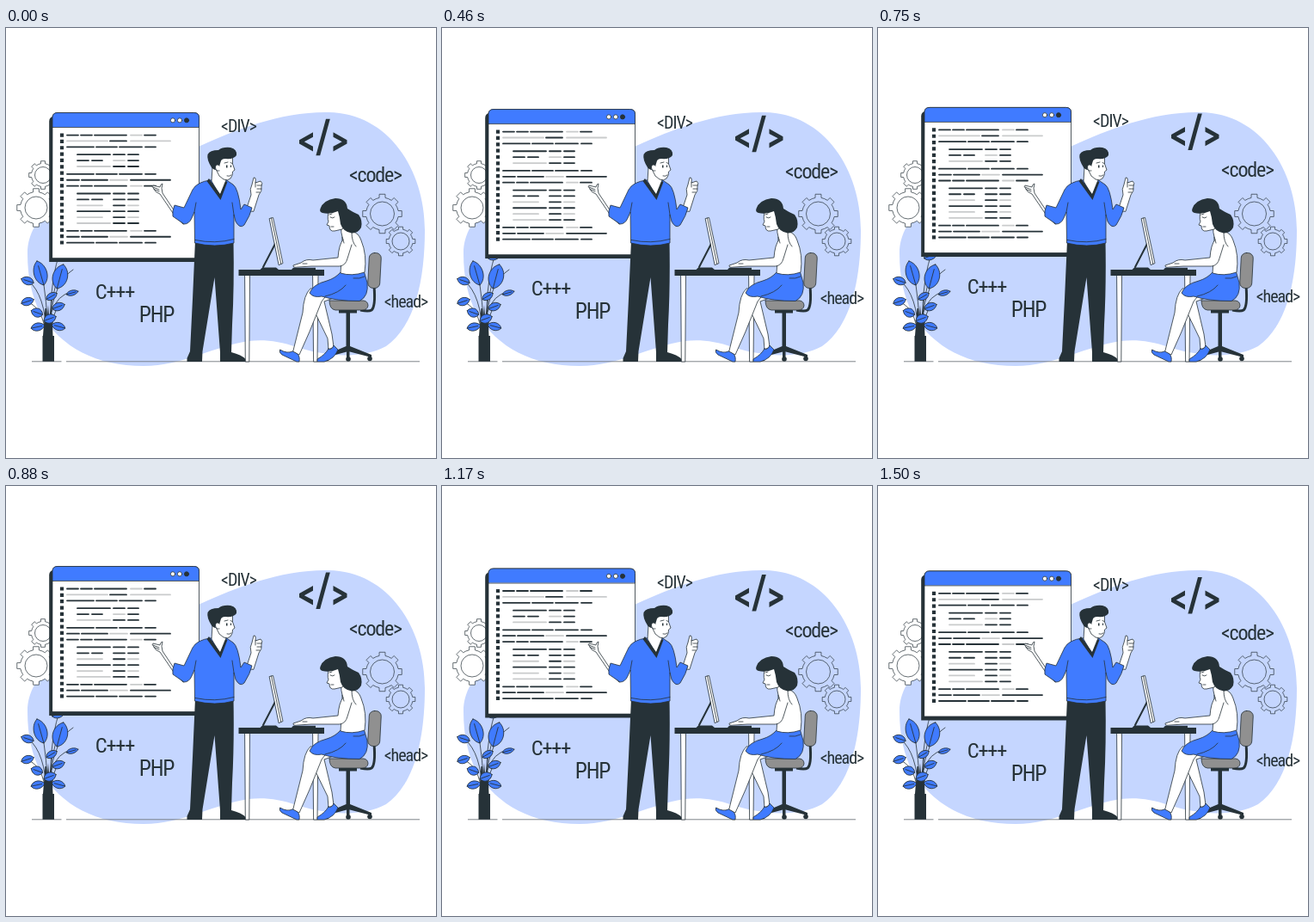
Recreate the animation shown at these times as an HTML page. Size 500 by 500 pixels, loop 1540 ms.

```html
<!DOCTYPE html>
<html lang="en">
<head>
<meta charset="utf-8">
<title>Developers</title>
<style>
  html, body { margin: 0; width: 100%; height: 100%; overflow: hidden; background: #fff; }
  svg { display: block; width: 100%; height: 100%; }
  .ink { fill: #263238; }
  .blue { fill: #407bff; }
  .white { fill: #fff; }
  .gray { fill: #909090; }
  .line { stroke: #263238; stroke-width: .8; stroke-linejoin: round; stroke-linecap: round; }
  .none { fill: none; }
  text {
    font-family: "Roboto Condensed", "Liberation Sans Narrow", "Open Sans Condensed", Roboto, sans-serif;
    font-stretch: condensed; font-weight: 400; letter-spacing: -.05em;
    text-anchor: middle; fill: #263238;
  }
</style>
</head>
<body>
<svg viewBox="0 0 500 500">
  <path fill="#c5d6ff" d="M25 262C25 238 38 222 52 207C85 172 160 165 226 137C268 118 320 97 375 98C445 99 487 165 487 235C487 292 476 346 442 370C412 387 365 380 338 371C318 364 300 362 282 364C245 369 205 393 160 393C105 393 65 372 40 332C30 312 25 290 25 262Z"/>
  <path d="M30 387.8H64.5M70 387.8H481" stroke="#70777b" stroke-width=".9"/>
  <g id="gears"></g>

  <g id="plant">
    <path class="line none" d="M48 358Q49 320 40 276M50 358Q50 315 64 280M52 358Q50 300 61 266M47 358Q46 310 26 294M46 358Q44 325 24 318M53 358Q54 328 62 323M53 330Q60 310 76 307M51 340Q56 295 78 281"/>
    <path class="ink" d="M43 358L45.5 326 47 326 47.5 340 49 322 50.5 340 53 323 54.5 358Z"/>
    <g id="leaves"></g>
    <path class="ink" d="M42.5 358H56V387.8H42.5Z"/>
  </g>

  <g class="float">
    <path class="ink" d="M50.2 109Q50.2 103.400 56 103.400H222V272.400H50.2Z"/>
    <path class="white line" d="M54 104.500Q54 98.900 60 98.900H218.5Q224.5 98.900 224.5 104.500V268H54Z"/>
    <path class="blue line" d="M54 115.500V104.500Q54 98.900 60 98.900H218.5Q224.5 98.900 224.5 104.500V115.500Z"/>
    <g class="white line">
      <circle cx="194" cy="107.7" r="2.6"/>
      <circle cx="202" cy="107.7" r="2.6"/>
      <circle class="ink" cx="210" cy="107.7" r="2.6"/>
    </g>
    <path d="M65 122.8V252.500" stroke="#263238" stroke-width="4.2" stroke-dasharray="4.2 3.15"/>
    <g id="code" stroke-width="1.8" stroke-linecap="round"></g>
  </g>

  <g class="float">
    <text x="270.5" y="121.500" font-size="20">&lt;DIV&gt;</text>
    <text x="429.5" y="179" font-size="24">&lt;code&gt;</text>
    <text x="465" y="325.5" font-size="20">&lt;head&gt;</text>
    <text x="126.5" y="315.800" font-size="24.5">C+++</text>
    <text x="175" y="342.600" font-size="25.5">PHP</text>
    <path class="ink" d="M341 130.5L357 121.5V127.2L346.8 132.6 357 138V143.8L341 134.8ZM372 106H376.8L365.2 148.5H360.4ZM396.5 130.5L380.5 121.5V127.2L390.7 132.6 380.5 138V143.8L396.5 134.8Z"/>
  </g>

  <g id="man">
    <path class="ink" d="M220 247L264.500 247Q265.500 300 263 345L262 377Q274 380 278.500 385V388H249V377L242.500 290 228.500 376 228 388H210.500V384L214 376 217 315Z"/>
    <path class="white line" d="M206 228L182 192Q180 186 182 181Q179 182 179 185L171 183Q169 184 172 187Q173 191 179 193L196 218Z"/>
    <path class="none line" d="M171 185L178 188M172 187.5L178 190"/>
    <path class="white line" d="M279 212L285 194Q283 187 286 182L288 174Q291 173 290 180L296 178Q299 180 297 184Q298 190 294 194L288 213Z"/>
    <path class="none line" d="M290 180V185M292 183L297 183M292 187L297 187M291 191L295 191"/>
    <path class="blue line" d="M237 177Q222 179 217 188L207 209 196 206Q193 213 194 219L207 228Q213 228 216 221L219 214 219.5 250Q243 256 265 250L265 217 267 225Q272 234 277 229Q284 218 286 209L277 205 273 211Q270 186 264 182L255 176Z"/>
    <path class="none line" d="M219 214L221 203M265 217L263 203M220 246.500Q243 251.500 265 245.500"/>
    <path class="white line" d="M240 162L239 178 249 195 256 179 255 174Z"/>
    <path class="ink" d="M236 175L249 193 255 178 257.5 179 249.5 200 233.5 178Z"/>
    <path class="white line" d="M243 156L245 166Q247 173 253 176Q258 178 261 175Q264 171 263.500 167L266 165 263.500 158V150L250 146Z"/>
    <path class="ink" d="M234.5 147Q237 142 247 142Q252 138 261 139Q269 141 268 148Q265 153 255 152Q250 152 249.500 156L248 161 245 160 243 165 239.500 163Q233 153 234.5 147Z"/>
    <path class="white line" d="M248 160Q244 157 243.500 162Q244 167 248 166"/>
    <path class="none line" d="M254 157L258 156M261 156.500L263 157.500M257 172Q260 173 262 171"/>
    <path class="ink" d="M256 159.500H257.500V162.500H256ZM261 159.500H262V162H261Z"/>
  </g>

  <g id="desk">
    <path class="white line" d="M278 287H283.5L282.8 388H278.7ZM357 287H363L362 388H358Z"/>
    <path class="ink" d="M270.5 281H370V288H270.5Z"/>
    <path class="none line" style="stroke-width:2" d="M314 249L299 278"/>
    <path class="ink" d="M295.5 281L298 278.5H314L317 281Z"/>
    <path class="white line" d="M306.5 221.5L310.5 220.5 322 273.5 317.5 275.5Z"/>
    <path class="none line" d="M308.5 221L319.8 274.5"/>
    <path class="ink" d="M332 281L334 278.8H360V281Z"/>
  </g>

  <g id="chair">
    <path class="none" stroke="#263238" stroke-width="3" d="M428 300Q430 324 425 328Q422 330 412 328"/>
    <rect class="gray line" x="421.5" y="261.5" width="14" height="41" rx="6" transform="rotate(3 428 282)"/>
    <path class="gray line" d="M376 317H416Q421 318 421 323Q420 328 414 328H383Q376 327 376 317Z"/>
    <path class="ink" d="M387 328H408V331.5H400V370L425 380V383L398 376 372 383V380L395.5 370V331.5H387Z"/>
    <path class="ink" d="M396 372H399.5V384H396Z"/>
    <g class="ink">
      <circle cx="373" cy="384.5" r="2.8"/>
      <circle cx="398" cy="385" r="2.8"/>
      <circle cx="423" cy="384.5" r="2.8"/>
    </g>
  </g>

  <g id="woman">
    <path class="white line" d="M358 308Q353 316 357 326L374 361 375 374 381 371 379 356 370 318 386 312Z"/>
    <path class="white line" d="M354 303Q346 310 345 331L333.500 377 341 380 353 353 367 318 374 309Z"/>
    <path class="blue line" d="M333 376Q327 379 318.5 374Q317 377 321 380L338 388H341Q342 382 339 379ZM375 373Q371 380 362 385V388H370Q382 385 386 374L381 369Q379 375 375 373Z"/>
    <path class="blue line" d="M389 284Q383 291 373 294Q357 298 353 308Q357 314 367 312Q384 317.500 411 317.500Q422 312 420 296L416 282Z"/>
    <path class="none line" d="M371 312Q388 308 395 299M417 289Q411 292 404 291"/>
    <path class="white line" d="M390 238Q393 247 388 258L390 270 389 285Q402 289 417 284Q420 264 413 247Q410 238 403 237L402 228 390 228Z"/>
    <path class="white line" d="M392 246Q387 252 386 267L357 270Q349 268 343 273L334 276Q333 279 340 278L355 277 388 277Q395 276 397 268L402 252"/>
    <path class="none line" d="M345 274L350 274M402 238Q402 249 407 254M391 243L393 250"/>
    <path class="white line" d="M376 210Q373 221 375 225L373 229 376 230Q376 237 382 236L391 234 399 224 395 208Z"/>
    <path class="ink" d="M365.500 210Q369 200 383 198Q396 198 397 210Q403 214 410 217Q415 224 413 232Q409 239 402 238.500Q392 237 389 228Q388 219 386 213Q377 217 368 215Q364 214 365.500 210Z"/>
    <path class="none line" d="M377 220Q380 222 382 220M376 217L379 216M378 231H381"/>
  </g>
</svg>
<script>
  const NS = "http://www.w3.org/2000/svg";
  const INK = "#263238", PALE = "#c9cbcc";
  const $ = id => document.getElementById(id);

  function add(parent, name, attrs) {
    const el = document.createElementNS(NS, name);
    for (const k in attrs) el.setAttribute(k, attrs[k]);
    return parent.appendChild(el);
  }

  function gear(cx, cy, r, hole, fill, teeth = 8) {
    const root = r * .82, step = 2 * Math.PI / teeth;
    const at = (rad, a) => (cx + rad * Math.cos(a)).toFixed(2) + " " + (cy + rad * Math.sin(a)).toFixed(2);
    let d = "";
    for (let i = 0; i < teeth; i++) {
      const a = i * step;
      d += (i ? "L" : "M") + at(root, a - step * .24) + "L" + at(r, a - step * .19) +
        "L" + at(r, a + step * .19) + "L" + at(root, a + step * .24) +
        `A${root} ${root} 0 0 1 ` + at(root, a + step * .76);
    }
    const g = add($("gears"), "g", { fill, stroke: INK, "stroke-width": .7, "stroke-linejoin": "round" });
    add(g, "path", { d: d + "Z" });
    add(g, "circle", { cx, cy, r: hole });
  }
  gear(43, 171, 16.5, 9.5, "#fff");
  gear(35, 209, 22.5, 13, "#fff");
  gear(437.5, 216, 23, 14, "none");
  gear(459, 248, 17, 10, "none");

  // x, y, half width, half length, tilt
  const leaves = [
    [61, 265, 4.5, 8, 70], [40, 285, 7.5, 14.5, -16], [63, 289, 8.5, 14.5, 15],
    [25, 294, 4.5, 7.5, -72], [25, 318, 4.5, 7.5, 72], [53, 312, 4, 7, 60],
    [61, 324, 4.5, 7.5, 70], [36, 331, 5, 7, -70], [51, 338, 5, 7.5, 70],
    [37, 347.5, 4.5, 8, 78], [61, 347, 4.5, 8, -75], [77, 308, 3, 7, 75]
  ];
  for (const [x, y, w, h, tilt] of leaves) {
    const g = add($("leaves"), "g", { transform: `translate(${x} ${y}) rotate(${tilt})`, class: "blue line" });
    add(g, "path", { d: `M0 ${-h}C${w * 1.3} ${-h * .6} ${w * 1.4} ${h * .6} 0 ${h}C${-w * 1.4} ${h * .6} ${-w * 1.3} ${-h * .6} 0 ${-h}Z` });
    add(g, "path", { d: `M0 ${-h * .6}V${h}` });
  }

  // Each kind of code row: start and end of its dashes, "-" for pale ones
  const kinds = {
    a: "71:84 87:100 103:140 -145:158 161:174",
    b: "-71:118 121:140 -145:191",
    c: "71:102 105:129 132:158 162:174",
    d: "83:121 125:138 142:154",
    e: "83:96 100:112 -125:138 142:154",
    f: "-83:121 125:138 142:154",
    g: "71:85 88:118 -121:141 145:191",
    h: "83:96 100:112 125:138 142:154",
    i: "-83:112 125:138 -142:154"
  };
  const ROW = 6.9, GAP = 1.95;
  let rowY = 124.9;
  for (const block of "abc def cga dhidif agc".split(" ")) {
    for (const kind of block) {
      for (const dash of kinds[kind].split(" ")) {
        const pale = dash[0] === "-";
        const [x1, x2] = dash.slice(pale ? 1 : 0).split(":");
        add($("code"), "path", { d: `M${x1} ${rowY}H${x2}`, stroke: pale ? PALE : INK });
      }
      rowY += ROW;
    }
    rowY += GAP;
  }

  // Linear bob at 24 steps a second
  const LOOP = 1540, STEPS = 37, RISE = 20 / 3;
  const floats = document.querySelectorAll(".float");
  function draw(now) {
    const step = Math.floor((now % LOOP + 4) * .024) + 1;
    const y = -RISE * (1 - Math.abs(1 - 2 * step / STEPS));
    floats.forEach(el => el.setAttribute("transform", `translate(0 ${y.toFixed(3)})`));
  }
  const start = performance.now();
  function tick() {
    draw(performance.now() - start);
    requestAnimationFrame(tick);
  }
  draw(0);
  requestAnimationFrame(tick);
</script>
</body>
</html>
```
